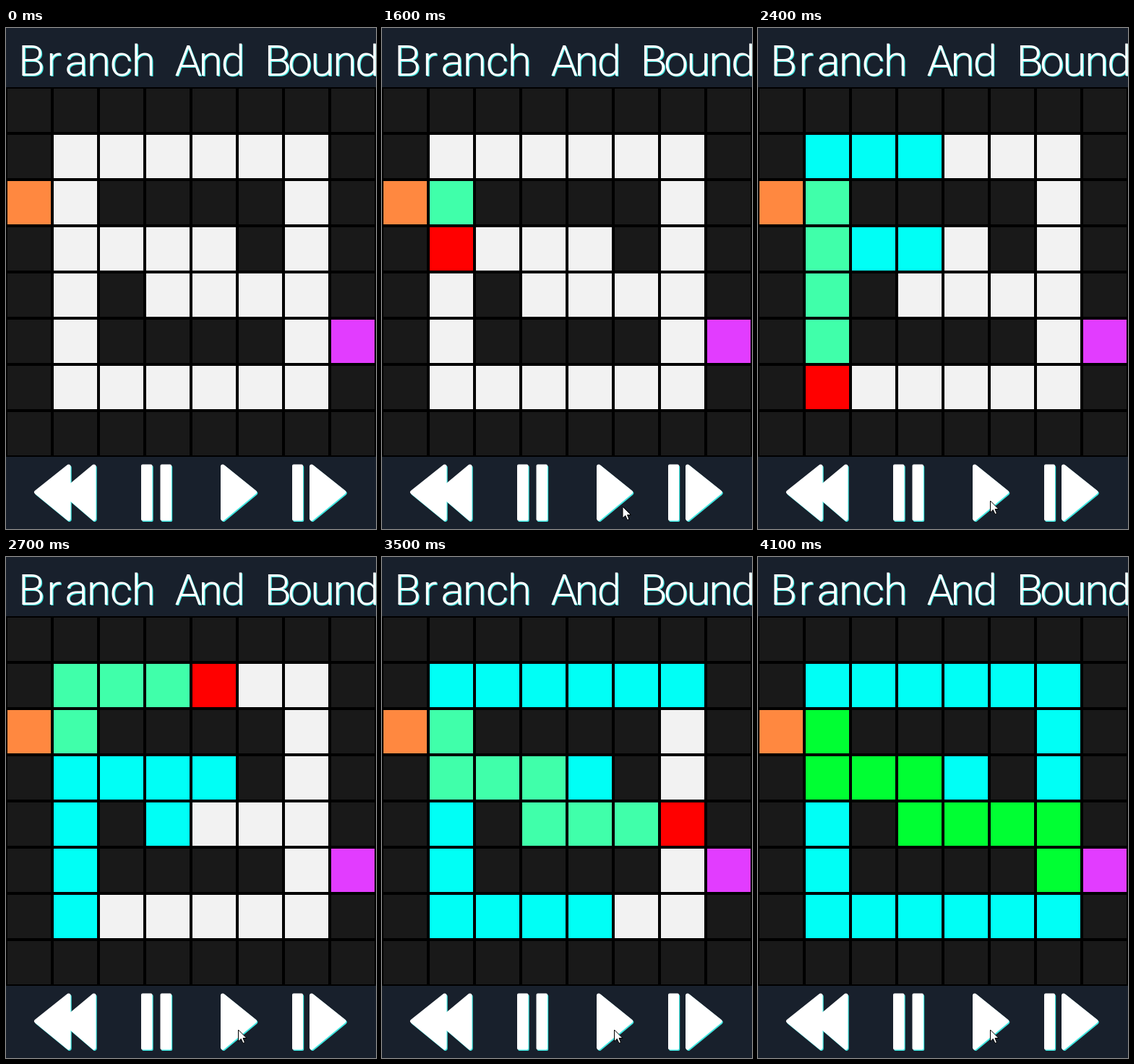
Recreate the animation shown at these times as an HTML page with a canvas. Size 512 px wide and 694 px high, loop 5000 ms.

```html
<!DOCTYPE html>
<html lang="en">
<head>
<meta charset="utf-8">
<title>Branch And Bound</title>
<style>
  html, body { margin: 0; width: 100%; height: 100%; overflow: hidden; background: #18202c; }
  canvas { display: block; }
</style>
</head>
<body>
<canvas id="stage" width="512" height="694"></canvas>
<script>
const ctx = document.getElementById('stage').getContext('2d');

const LOOP = 5000, STEP = 100, SEARCH_START = 1500;
const SIZE = 8, CELL = 64, GRID_TOP = 82;
const BACK = '#18202c', GLOW = '#3fe6e0';
const COLOR = {
  wall: '#191919', open: '#f2f2f2', start: '#ff8840', goal: '#e23cff',
  seen: '#00fff6', path: '#40ffaa', head: '#ff0000', done: '#00ff33'
};

const MAZE = [
  '########',
  '#......#',
  'S.####.#',
  '#....#.#',
  '#.#....#',
  '#.####.G',
  '#......#',
  '########'
].join('');
const START = MAZE.indexOf('S'), GOAL = MAZE.indexOf('G');

// Breadth-first order of visits: down, up, right, left.
function search() {
  const parent = new Map([[START, -1]]);
  const order = [START];
  for (let i = 0; i < order.length && order[i] !== GOAL; i++) {
    const at = order[i], col = at % SIZE;
    const next = [at + SIZE, at - SIZE];
    if (col < SIZE - 1) next.push(at + 1);
    if (col > 0) next.push(at - 1);
    for (const n of next) {
      if (MAZE[n] && MAZE[n] !== '#' && !parent.has(n)) {
        parent.set(n, at);
        order.push(n);
      }
    }
  }
  return { order, parent };
}
const { order, parent } = search();
const last = order.indexOf(GOAL);

function cellColors(step) {
  const kinds = { '#': 'wall', '.': 'open', S: 'start', G: 'goal' };
  const cells = [...MAZE].map(c => COLOR[kinds[c]]);
  const n = Math.min(step, last);
  if (n < 1) return cells;
  for (let i = 1; i <= n; i++) cells[order[i]] = COLOR.seen;
  const head = order[n], found = head === GOAL;
  for (let c = parent.get(head); c !== START; c = parent.get(c)) {
    cells[c] = found ? COLOR.done : COLOR.path;
  }
  cells[head] = found ? COLOR.goal : COLOR.head;
  return cells;
}

function drawGrid(step) {
  ctx.fillStyle = '#000';
  ctx.fillRect(0, GRID_TOP, 512, 512);
  cellColors(step).forEach((color, i) => {
    ctx.fillStyle = color;
    ctx.fillRect(i % SIZE * CELL + 2, GRID_TOP + Math.floor(i / SIZE) * CELL + 2, 60, 60);
  });
}

// Paints a shape in the glow colour, then in white just above it.
function glowing(paint) {
  for (const [color, dx, dy] of [[GLOW, 1.2, 1.4], ['#fff', 0, 0]]) {
    ctx.save();
    ctx.translate(dx, dy);
    ctx.fillStyle = ctx.strokeStyle = color;
    paint();
    ctx.restore();
  }
}

function drawTitle() {
  ctx.font = '300 60px Roboto, "Noto Sans", sans-serif';
  ctx.textAlign = 'center';
  ctx.textBaseline = 'alphabetic';
  glowing(() => {
    [...'Branch And Bound'].forEach((ch, i) => ctx.fillText(ch, 35.5 + i * 30.95, 65.5));
  });
}

function poly(points) {
  ctx.beginPath();
  points.forEach(([x, y]) => ctx.lineTo(x, y));
  ctx.closePath();
}

function rounded(points, radius) {
  poly(points);
  ctx.lineJoin = 'round';
  ctx.lineWidth = radius * 2;
  ctx.fill();
  ctx.stroke();
}

const arrow = (base, tip) => rounded([[base, 607.5], [tip, 643], [base, 679.5]], 3);
const bar = (x, w) => rounded([[x + 2, 606.5], [x + w - 2, 606.5], [x + w - 2, 680.5], [x + 2, 680.5]], 2);

function drawButtons() {
  glowing(() => {
    arrow(86.5, 42);
    arrow(121.5, 79);
    bar(187, 15.5);
    bar(213.5, 15.5);
    arrow(300, 344);
    bar(396, 15);
    arrow(423, 467.5);
  });
}

// Pointer waypoints: time, x, y.
const TRACK = [[1100, 319.5, 690.5], [1300, 332, 669], [1400, 333, 664], [1600, 333, 663], [1800, 321.5, 655]];

function drawPointer(t) {
  if (t < TRACK[0][0]) return;
  let [, x, y] = TRACK[TRACK.length - 1];
  for (let i = 1; i < TRACK.length; i++) {
    const [t0, x0, y0] = TRACK[i - 1], [t1, x1, y1] = TRACK[i];
    if (t >= t0 && t < t1) {
      const k = (t - t0) / (t1 - t0);
      x = x0 + (x1 - x0) * k;
      y = y0 + (y1 - y0) * k;
    }
  }
  ctx.save();
  ctx.translate(x, y);
  poly([[0, 0], [0, 16], [3.8, 12.5], [6.5, 18.5], [9, 17.5], [6.5, 11.5], [11.5, 11.5]]);
  ctx.fillStyle = '#fff';
  ctx.strokeStyle = '#000';
  ctx.lineJoin = 'miter';
  ctx.lineWidth = 1;
  ctx.fill();
  ctx.stroke();
  ctx.restore();
}

function draw(now) {
  const t = Math.floor(now % LOOP / STEP) * STEP;
  ctx.fillStyle = BACK;
  ctx.fillRect(0, 0, 512, 694);
  drawTitle();
  drawGrid((t - SEARCH_START) / STEP + 1);
  drawButtons();
  drawPointer(t);
}

const begin = performance.now();
function tick() {
  draw(performance.now() - begin);
  requestAnimationFrame(tick);
}
tick();
</script>
</body>
</html>
```
